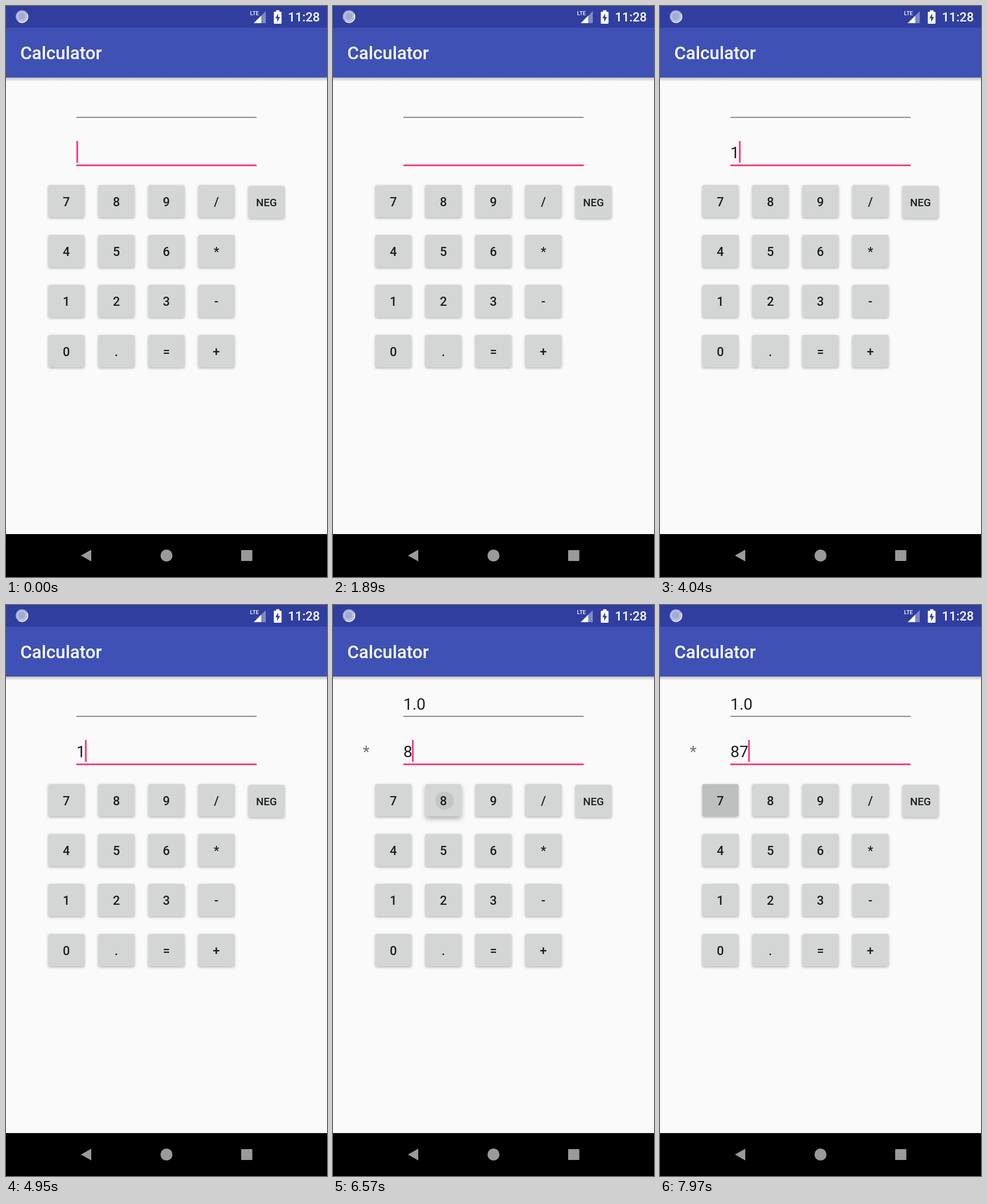
An HTML page with a canvas that plays this animation: 561 by 998 pixels, repeating every 8000 ms.

```html
<!DOCTYPE html>
<html lang="en">
<head>
<meta charset="utf-8">
<title>Calculator</title>
<style>
html, body { margin: 0; width: 561px; height: 998px; overflow: hidden; background: #fafafa; }
canvas { display: block; }
</style>
</head>
<body>
<canvas id="stage" width="561" height="998"></canvas>
<script>
const ctx = document.getElementById('stage').getContext('2d');
const LOOP = 8000;
const PINK = '#f7407e', INK = '#1e1e1e', GREY = '#757575';
const KEYS = ['789/', '456*', '123-', '0.=+'];
const BLINKS = [[0, 680], [1180, 1680], [2180, 2680], [3180, 4210], [4950, 5620], [6450, 7100], [7760, LOOP]];
// Each tap: start time, touch point inside the key
const TAPS = {
  '1': { at: 3590, x: 109, y: 511 },
  '*': { at: 5000, x: 370, y: 428 },
  '8': { at: 6490, x: 195, y: 342 },
  '7': { at: 7765, x: 106, y: 342 }
};
const RELEASE = 60;
const clamp = v => Math.max(0, Math.min(1, v));

function text(str, x, y, size, weight, color, align = 'left') {
  ctx.font = `${weight} ${size}px Roboto, sans-serif`;
  ctx.textAlign = align;
  ctx.fillStyle = color;
  ctx.fillText(str, x, y);
}

function rect(x, y, w, h, color) {
  ctx.fillStyle = color;
  ctx.fillRect(x, y, w, h);
}

function poly(color, ...pts) {
  ctx.beginPath();
  pts.forEach(([x, y]) => ctx.lineTo(x, y));
  ctx.closePath();
  ctx.fillStyle = color;
  ctx.fill();
}

function disc(x, y, r, color) {
  ctx.beginPath();
  ctx.arc(x, y, r, 0, Math.PI * 2);
  ctx.fillStyle = color;
  ctx.fill();
}

function roundBox(x, y, w, h, r) {
  ctx.beginPath();
  ctx.roundRect(x, y, w, h, r);
}

function statusBar() {
  rect(0, 0, 561, 38, '#303f9f');
  disc(28, 18.5, 11, '#a3abd6');
  ctx.lineWidth = 2;
  ctx.strokeStyle = '#e8eaf6';
  ctx.beginPath();
  ctx.arc(28, 18.5, 10, -0.5, 2.2);
  ctx.stroke();
  ctx.setLineDash([1.5, 1.5]);
  ctx.lineWidth = 1.5;
  ctx.beginPath();
  ctx.arc(27.5, 18, 7.5, 0, Math.PI * 2);
  ctx.stroke();
  ctx.setLineDash([]);

  text('LTE', 426.5, 16, 9.5, 500, '#fff');
  poly('rgba(255,255,255,.38)', [433, 30], [454, 30], [454, 9]);
  poly('#fff', [433, 30], [446, 30], [446, 17]);

  rect(472, 7.5, 6, 4, '#fff');
  ctx.fillStyle = '#fff';
  roundBox(468, 10, 13.5, 21, 1.5);
  ctx.fill();
  poly('#303f9f', [475.6, 13], [470.8, 21.5], [474, 21.5], [474, 28], [479, 19.2], [475.6, 19.2]);
  text('11:28', 548.5, 27, 22, 500, '#fff', 'right');
}

function toolbar() {
  rect(0, 38, 561, 87, '#3f51b5');
  const fade = ctx.createLinearGradient(0, 125, 0, 132);
  fade.addColorStop(0, 'rgba(0,0,0,.24)');
  fade.addColorStop(1, 'rgba(0,0,0,0)');
  rect(0, 125, 561, 7, fade);
  text('Calculator', 25, 93, 31.2, 500, '#fff');
}

function navBar() {
  const tone = '#9b999b';
  rect(0, 923, 561, 75, '#000');
  poly(tone, [131, 960.5], [149, 950.3], [149, 970.7]);
  disc(280.5, 960.5, 10.5, tone);
  ctx.fillStyle = tone;
  roundBox(411, 951, 19.5, 19, 1);
  ctx.fill();
}

function key(label, x, y, t) {
  const tap = TAPS[label];
  const dt = tap ? t - tap.at : -1;
  const lift = dt > 0 && dt < 180 ? Math.sin(Math.PI * dt / 180) : 0;

  ctx.save();
  ctx.shadowColor = 'rgba(0,0,0,.3)';
  ctx.shadowBlur = 4 + 5 * lift;
  ctx.shadowOffsetY = 1.5 + 2.5 * lift;
  ctx.fillStyle = '#d4d6d5';
  roundBox(x, y, 63, 56.5, 3);
  ctx.fill();
  ctx.restore();

  if (dt > 0 && dt < 450) {
    const grow = clamp(dt / 200);
    const alpha = (0.055 + 0.05 * grow) * clamp((450 - dt) / 230);
    ctx.save();
    roundBox(x, y, 63, 56.5, 3);
    ctx.clip();
    disc(tap.x, tap.y, 48 * Math.pow(grow, 1.2), `rgba(0,0,0,${alpha})`);
    ctx.restore();
  }

  const wide = label.length > 1;
  text(label, x + 31.5, y + (wide ? 35 : 36.7), wide ? 18.7 : 21.8, 500, INK, 'center');
}

function keypad(t) {
  KEYS.forEach((row, r) => {
    [...row].forEach((label, c) => key(label, 74 + 87.4 * c, 313 + 87.3 * r, t));
  });
  key('NEG', 423.7, 314.5, t);
}

function fields(t) {
  const done = label => t >= TAPS[label].at + RELEASE;
  rect(123, 193.8, 315, 1.6, '#72726e');
  rect(123, 277, 315, 3, PINK);

  let entry = '';
  if (done('*')) {
    text('1.0', 123, 183, 28, 400, INK);
    text('*', 52, 266, 28, 400, GREY);
    if (done('8')) entry = '8';
    if (done('7')) entry = '87';
  } else if (done('1')) {
    entry = '1';
  }
  text(entry, 123, 266, 28, 400, INK);
  if (BLINKS.some(([on, off]) => t >= on && t < off)) {
    rect(Math.round(123 + ctx.measureText(entry).width - 0.3), 236, 3, 38, PINK);
  }
}

function draw(now) {
  const t = now % LOOP;
  rect(0, 0, 561, 998, '#fafafa');
  statusBar();
  toolbar();
  fields(t);
  keypad(t);
  navBar();
}

let start;
function tick(now) {
  start ??= now;
  draw(now - start);
  requestAnimationFrame(tick);
}
draw(0);
requestAnimationFrame(tick);
</script>
</body>
</html>
```
